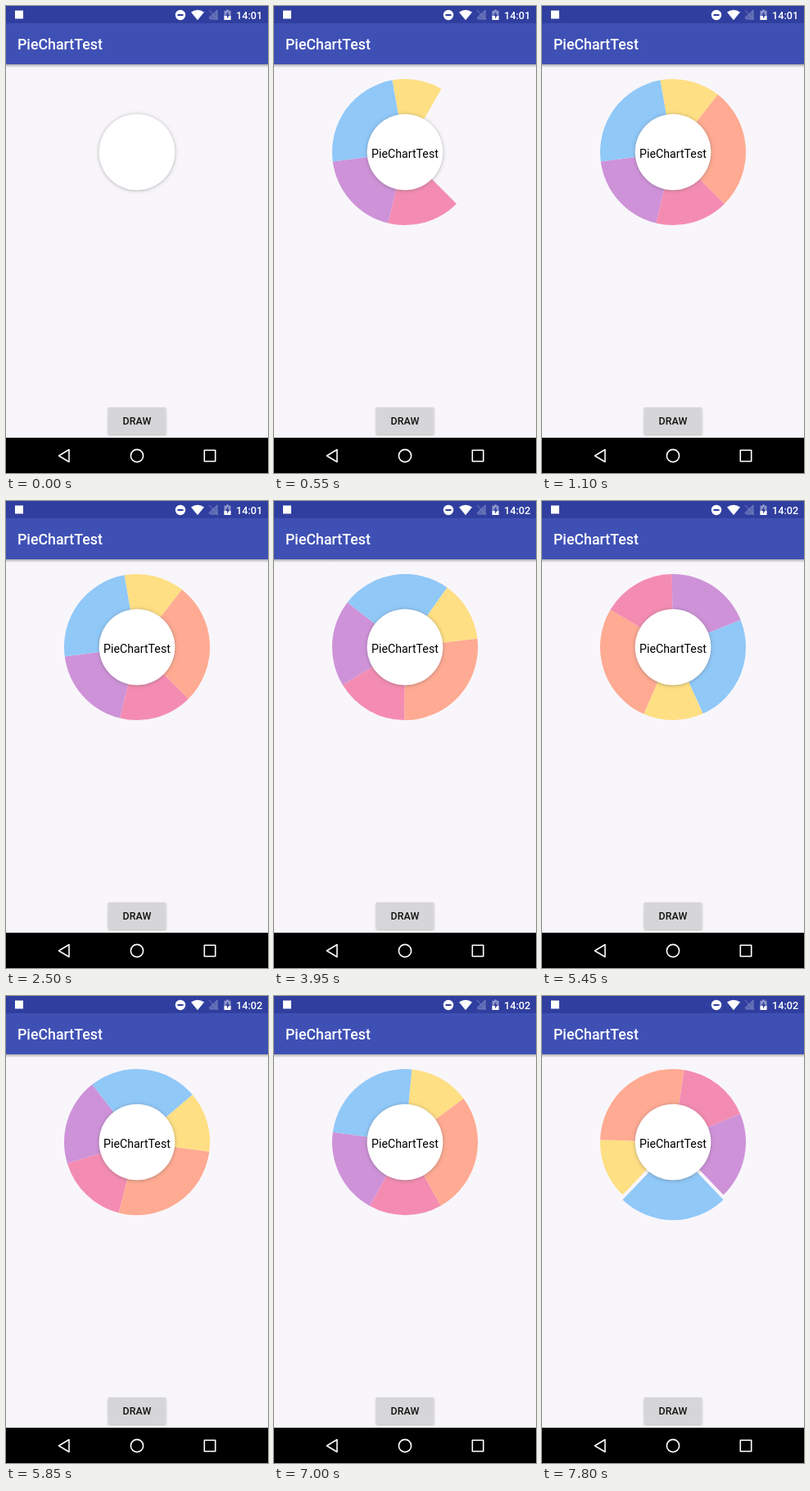
Write an HTML page that moves like this. It is 320 px wide and 569 px high and loops after 8 s.

```html
<!DOCTYPE html>
<html lang="en">
<head>
<meta charset="utf-8">
<title>Pie chart</title>
<style>
  html, body { margin: 0; width: 100%; height: 100%; overflow: hidden; background: #f8f6fa; }
  svg { display: block; width: 100vw; height: 100vh; font-family: Roboto, sans-serif; }
  .medium { font-weight: 500; }
</style>
</head>
<body>
<svg viewBox="0 0 320 569">
  <defs>
    <filter id="glow" x="-20%" y="-20%" width="140%" height="140%">
      <feDropShadow dx="0" dy="0.5" stdDeviation="2.2" flood-color="#555" flood-opacity=".5"/>
    </filter>
    <filter id="lift" x="-10%" y="-20%" width="120%" height="150%">
      <feDropShadow dx="0" dy="1" stdDeviation="0.8" flood-color="#000" flood-opacity=".25"/>
    </filter>
    <linearGradient id="edge" x2="0" y2="1">
      <stop stop-color="#000" stop-opacity=".3"/>
      <stop offset="1" stop-color="#000" stop-opacity="0"/>
    </linearGradient>
  </defs>

  <rect width="320" height="569" fill="#f8f6fa"/>
  <rect y="71" width="320" height="4" fill="url(#edge)"/>
  <rect y="21" width="320" height="50" fill="#3f50b5"/>
  <rect width="320" height="21" fill="#303f9f"/>
  <text class="medium" x="14" y="53" font-size="17.8" fill="#fff">PieChartTest</text>

  <!-- status bar -->
  <g fill="#fff">
    <rect x="11" y="5.5" width="10" height="10"/>
    <circle cx="213" cy="11" r="6.2"/>
    <rect x="209.5" y="10" width="7" height="2" fill="#303f9f"/>
    <path d="M226 7.5Q234 1.8 242 7.5L234 17.2Z"/>
    <path d="M258 5V16H249.500L248 14.500L258 5ZM248 5L259 17" fill="#7580bf" fill-opacity=".6" stroke="#7580bf"/>
    <path d="M269 4.500h3v1.300h2.500v11.200h-8v-11.200h2.500Z" fill-opacity=".45"/>
    <path d="M266.500 12h8v5h-8Z"/>
    <path d="M271.300 6.800l-3.300 5h2v3.600l3.300-5h-2Z" fill="#303f9f"/>
    <text id="clock" class="medium" x="281" y="15.500" font-size="12.700">14:01</text>
  </g>

  <g id="pie"></g>
  <circle cx="160" cy="178" r="46.300" fill="#fff" filter="url(#glow)"/>
  <text id="label" x="160" y="185" font-size="14.200" text-anchor="middle">PieChartTest</text>

  <rect x="124.500" y="489" width="71" height="33" rx="1.800" fill="#d6d5d7" filter="url(#lift)"/>
  <text class="medium" x="160" y="510" font-size="12.400" text-anchor="middle" fill="#111">DRAW</text>

  <!-- navigation bar -->
  <rect y="526" width="320" height="43" fill="#000"/>
  <g fill="none" stroke="#fff" stroke-width="1.600" stroke-linejoin="round">
    <path d="M64.500 548L77 540.500V555.500Z"/>
    <circle cx="160" cy="548" r="7.600"/>
    <rect x="242.300" y="541.300" width="13.400" height="13.400"/>
  </g>
</svg>
<script>
const LOOP = 8000, CX = 160, CY = 178, R = 89, START = 45, POP = 6;
const slices = [
  { sweep: 58.5, color: '#f48cb2' },
  { sweep: 69, color: '#ce92d8' },
  { sweep: 87.5, color: '#90c8f8' },
  { sweep: 48, color: '#fedf83' },
  { sweep: 97, color: '#ffaa92' }
];
// Each turn brings the picked slice to the bottom.
const turns = [
  { at: 2500, time: 450, pick: 0 },
  { at: 3850, time: 800, pick: 3 },
  { at: 5450, time: 800, pick: 0 },
  { at: 7000, time: 800, pick: 2 }
];
const $ = id => document.getElementById(id);
const easeOut = p => Math.sin(Math.min(1, Math.max(0, p)) * Math.PI / 2);

let angle = START;
for (const s of slices) {
  s.from = angle;
  angle += s.sweep;
  s.path = document.createElementNS('http://www.w3.org/2000/svg', 'path');
  s.path.setAttribute('fill', s.color);
  $('pie').append(s.path);
}

let heading = 0;
for (const turn of turns) {
  const { from, sweep } = slices[turn.pick];
  const delta = 90 - from - sweep / 2 - heading;
  turn.from = heading;
  turn.by = delta - 360 * Math.round(delta / 360);
  heading += turn.by;
}

function point(deg) {
  const a = deg * Math.PI / 180;
  return `${CX + R * Math.cos(a)} ${CY + R * Math.sin(a)}`;
}

function draw() {
  const t = performance.now() % LOOP;
  const end = START + 360 * easeOut((t - 50) / 1000);
  const turn = turns.findLast(k => t >= k.at);
  const progress = turn ? (t - turn.at) / turn.time : 0;
  const spin = turn ? turn.from + turn.by * easeOut(progress) : 0;

  slices.forEach((s, i) => {
    const to = Math.min(s.from + s.sweep, end);
    const popped = turn && progress >= 1 && turn.pick === i;
    s.path.setAttribute('d', to > s.from
      ? `M${CX} ${CY}L${point(s.from + spin)}A${R} ${R} 0 0 1 ${point(to + spin)}Z` : '');
    s.path.setAttribute('transform', `translate(0 ${popped ? POP : 0})`);
  });
  $('label').setAttribute('visibility', t < 50 ? 'hidden' : 'visible');
  $('clock').textContent = t < 3550 ? '14:01' : '14:02';
  requestAnimationFrame(draw);
}
draw();
</script>
</body>
</html>
```
